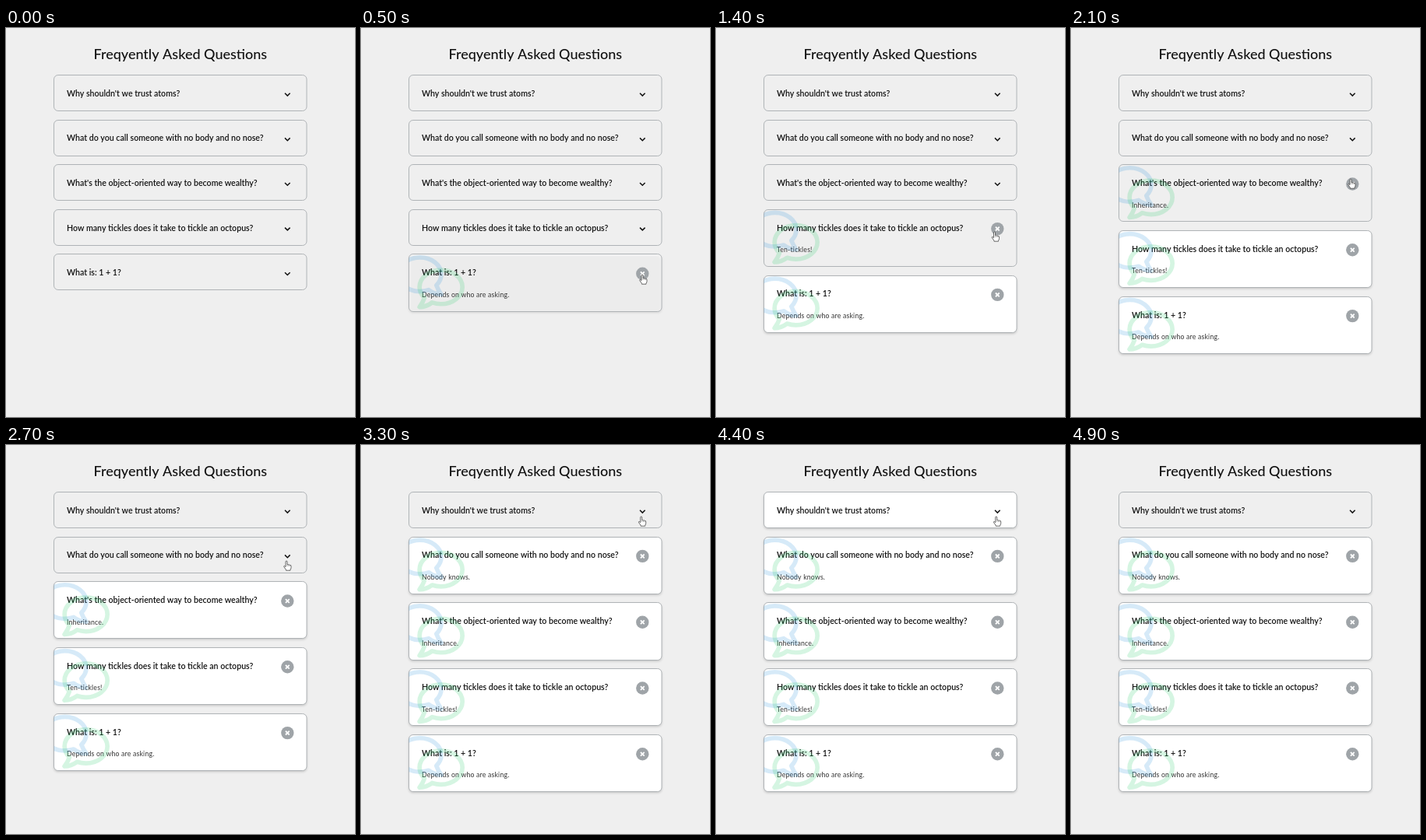
Write an HTML page with a canvas that moves like this. It is 448 px wide and 500 px high and loops after 5300 ms.

```html
<!DOCTYPE html>
<html lang="en">
<head>
<meta charset="utf-8">
<title>FAQ accordion</title>
<style>
  html, body { margin: 0; width: 100%; height: 100%; overflow: hidden; background: #efefef; }
  canvas { display: block; width: 448px; height: 500px; }
</style>
</head>
<body>
<canvas id="stage"></canvas>
<script>
const W = 448, H = 500, LOOP = 5300, STEP = 100, FADE = 300;
const FONT = 'Lato, "Open Sans", sans-serif';
const CARD = { x: 61.5, y: 60.5, w: 324.5, closed: 46, open: 73.2, gap: 11.6 };
const TOGGLE = { x: 361.3, y: 24.8, r: 8.2 };

const faqs = [
  { q: "Why shouldn't we trust atoms?", a: 'They make up everything.', open: 3500, close: 4400 },
  { q: 'What do you call someone with no body and no nose?', a: 'Nobody knows.', open: 2900 },
  { q: "What's the object-oriented way to become wealthy?", a: 'Inheritance.', open: 2100 },
  { q: 'How many tickles does it take to tickle an octopus?', a: 'Ten-tickles!', open: 1400 },
  { q: 'What is: 1 + 1?', a: 'Depends on who are asking.', open: 400 }
];

// Pointer path: time, x, y
const path = [
  [200, 366, 392], [300, 363, 345], [400, 361, 317], [700, 361, 317],
  [800, 366, 300], [900, 368.5, 276], [1000, 362, 266], [1100, 357.5, 262],
  [1500, 357.5, 262], [1600, 360, 235], [1700, 360, 207], [1800, 359, 194],
  [2300, 359, 194], [2500, 361, 165], [2700, 360, 149], [3000, 360, 149],
  [3200, 360, 110], [3300, 359.7, 92], [4900, 359.7, 92]
];

const bubble = new Path2D('M256 56C128 56 24 138 24 240c0 46 20 85 53 118C62 404 24 456 24 456' +
  'c56 0 103-23 136-48 30 10 62 16 96 16 128 0 232-82 232-184S384 56 256 56z');
const arrow = new Path2D('M0 0V8.6L2 6.9 3.4 9.8 4.7 9.2 3.4 6.4H5.9Z');
const hand = new Path2D('M-1 1Q-1 0 0 0T1 1V4.6Q2 4 2.8 5 3.8 4.4 4.5 5.4 6 5 6 6.6V8.5' +
  'Q6 10 5 11.2V12.2H-.6V11.2L-3.2 7.6Q-3.6 6.4-2.6 6.4L-1 7.6Z');

const canvas = document.getElementById('stage');
const ctx = canvas.getContext('2d');
const dpr = window.devicePixelRatio || 1;
canvas.width = W * dpr;
canvas.height = H * dpr;

// CSS "ease": cubic-bezier(.25, .1, .25, 1)
function ease(x) {
  if (x <= 0) return 0;
  if (x >= 1) return 1;
  const bez = (u, a, b) => 3 * u * (1 - u) * (1 - u) * a + 3 * u * u * (1 - u) * b + u * u * u;
  let lo = 0, hi = 1;
  for (let i = 0; i < 24; i++) {
    const mid = (lo + hi) / 2;
    if (bez(mid, .25, .25) < x) lo = mid; else hi = mid;
  }
  return bez(lo, .1, 1);
}

function text(str, x, y, font, spacing, color) {
  ctx.font = font + ' ' + FONT;
  ctx.letterSpacing = spacing + 'px';
  ctx.fillStyle = color;
  ctx.fillText(str, x, y);
}

function line(points, color, width) {
  ctx.beginPath();
  for (const [x, y] of points) ctx.lineTo(x, y);
  ctx.strokeStyle = color;
  ctx.lineWidth = width;
  ctx.stroke();
}

function drawBubble(x, y, color, flip) {
  const size = 60.7, k = size / 512;
  ctx.save();
  ctx.translate(flip ? x + size : x, y);
  ctx.scale(flip ? -k : k, k);
  ctx.globalAlpha = .2;
  ctx.strokeStyle = color;
  ctx.lineWidth = 48;
  ctx.lineJoin = 'round';
  ctx.stroke(bubble);
  ctx.restore();
}

function drawPanel(y, h, white) {
  const box = new Path2D();
  box.roundRect(CARD.x, Math.floor(y) + .5, CARD.w, Math.floor(y + h) - Math.floor(y), 5.4);
  if (white > 0) {
    ctx.save();
    ctx.globalAlpha = white;
    ctx.fillStyle = '#fff';
    ctx.shadowColor = 'rgba(0,0,0,.2)';
    ctx.shadowBlur = 3.3 * dpr;
    ctx.shadowOffsetY = 1.6 * dpr;
    ctx.fill(box);
    ctx.restore();
  }
  ctx.strokeStyle = '#a9adb0';
  ctx.lineWidth = .9;
  ctx.stroke(box);
  return box;
}

function drawCard(faq, y, h, isOpen, white) {
  const box = drawPanel(y, h, white);
  text(faq.q, 78, y + 27.3, '600 10.6px', 0, '#111');
  const cx = TOGGLE.x, cy = y + TOGGLE.y;
  if (!isOpen) {
    line([[cx - 3.3, cy - 1.5], [cx, cy + 1.8], [cx + 3.3, cy - 1.5]], '#111', 1.5);
    return;
  }
  text(faq.a, 78, y + 54.8, '400 8.7px', .2, '#333');
  ctx.save();
  ctx.clip(box);
  drawBubble(45.2, y - 2.6, '#3498db', true);
  drawBubble(72.3, y + 13.6, '#2ecc71', false);
  ctx.restore();
  ctx.beginPath();
  ctx.arc(cx, cy, TOGGLE.r, 0, 2 * Math.PI);
  ctx.fillStyle = '#9fa4a8';
  ctx.fill();
  line([[cx - 2.4, cy - 2.4], [cx + 2.4, cy + 2.4]], '#fff', 1.8);
  line([[cx + 2.4, cy - 2.4], [cx - 2.4, cy + 2.4]], '#fff', 1.8);
}

function pointerAt(t) {
  const i = path.findIndex(p => p[0] > t);
  if (i < 1) return null;
  const [t0, x0, y0] = path[i - 1], [t1, x1, y1] = path[i];
  const k = (t - t0) / (t1 - t0);
  return { x: x0 + (x1 - x0) * k, y: y0 + (y1 - y0) * k };
}

function drawPointer(p, tops) {
  const over = tops.some(y => Math.abs(p.x - TOGGLE.x) < 8.3 && Math.abs(p.y - y - TOGGLE.y) < 8.3);
  const shape = over ? hand : arrow;
  ctx.save();
  ctx.translate(p.x, p.y);
  if (!over) ctx.scale(.9, .9);
  ctx.fillStyle = '#fff';
  ctx.strokeStyle = '#444';
  ctx.lineWidth = .8;
  ctx.lineJoin = 'round';
  ctx.fill(shape);
  ctx.stroke(shape);
  if (over) {
    line([[1, 4.6], [1, 7]], '#666', .5);
    line([[2.8, 5], [2.8, 7]], '#666', .5);
    line([[4.5, 5.4], [4.5, 7]], '#666', .5);
  }
  ctx.restore();
}

function draw(t) {
  ctx.setTransform(dpr, 0, 0, dpr, 0, 0);
  ctx.fillStyle = '#efefef';
  ctx.fillRect(0, 0, W, H);
  ctx.textAlign = 'left';
  text('Freqyently Asked Questions', 112.5, 40, '500 18px', 0, '#111');

  const tops = [];
  let y = CARD.y;
  for (const faq of faqs) {
    const closed = faq.close !== undefined && t >= faq.close;
    const isOpen = t >= faq.open && !closed;
    const white = closed ? 1 - ease((t - faq.close) / FADE) : ease((t - faq.open) / FADE);
    const h = isOpen ? CARD.open : CARD.closed;
    drawCard(faq, y, h, isOpen, white);
    tops.push(y);
    y += h + CARD.gap;
  }
  const p = pointerAt(t);
  if (p) drawPointer(p, tops);
}

const start = performance.now();
function tick() {
  const t = (performance.now() - start) % LOOP;
  draw(Math.floor(t / STEP) * STEP);
  requestAnimationFrame(tick);
}
tick();
</script>
</body>
</html>
```
